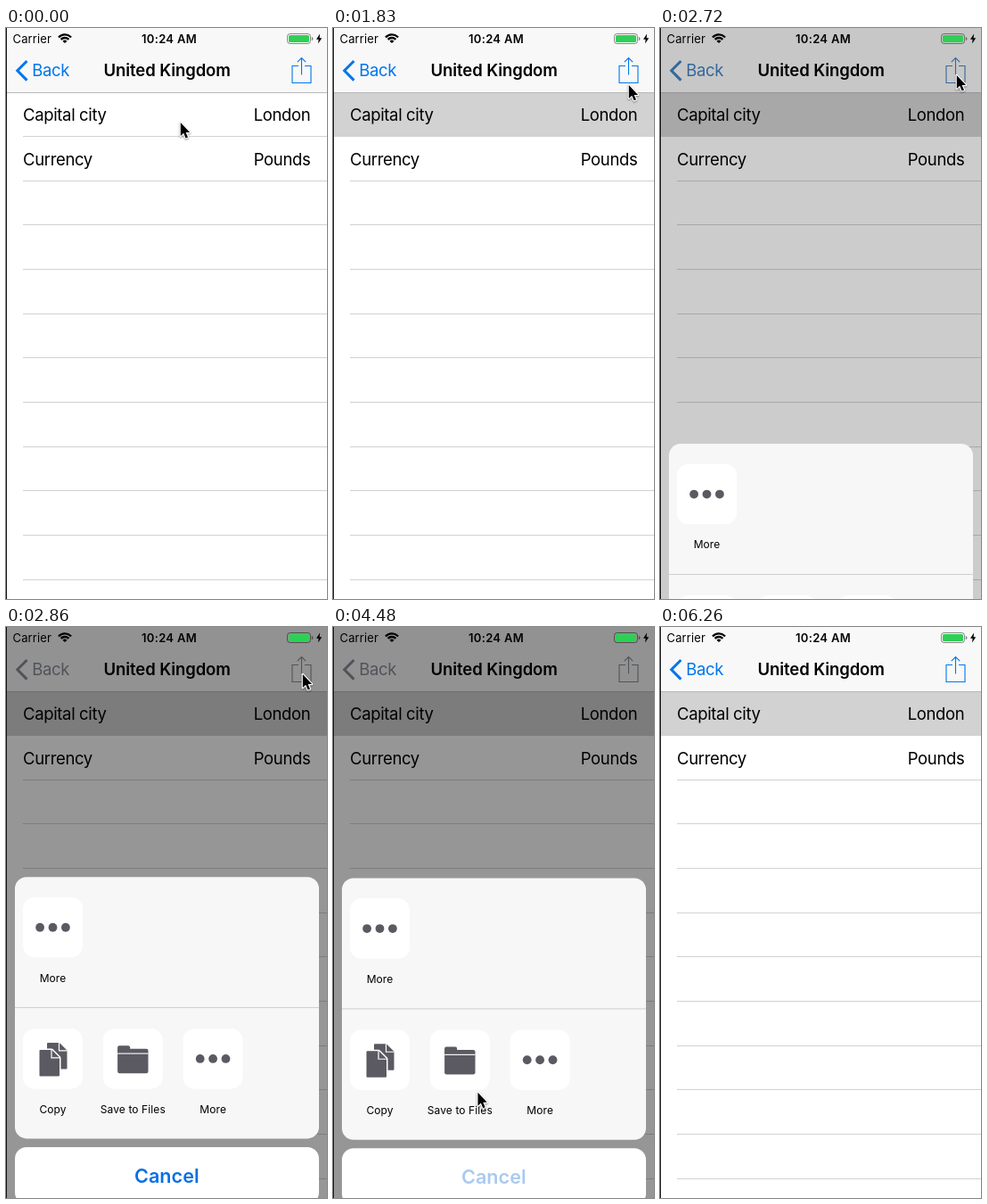
Recreate the animation shown at these times as an HTML page with a canvas. Size 360 by 640 pixels, loop 6290 ms.

```html
<!DOCTYPE html>
<html lang="en">
<head>
<meta charset="utf-8">
<title>Share sheet</title>
<style>
  html, body { margin: 0; width: 100%; height: 100%; overflow: hidden; background: #fff; }
  canvas { display: block; width: 360px; height: 640px; }
</style>
</head>
<body>
<canvas id="stage"></canvas>
<script>
const W = 360, H = 640, LOOP = 6290;
const canvas = document.getElementById('stage');
const ctx = canvas.getContext('2d');
const dpr = window.devicePixelRatio || 1;
canvas.width = W * dpr;
canvas.height = H * dpr;

const FONT = 'Inter, Roboto, "Liberation Sans", sans-serif';
const ICON = '#5b5a62';
const BLUE = [0, 118, 236], GREY = [142, 142, 147];
const ROW = 49.65, NAV = 72;
const SELECT_AT = 900, OPEN_AT = 2657.4, PRESS_AT = 4450, CLOSE_AT = 4467.7;
const DROP = 375, DIM = 0.43;

const smooth = u => u * u * (3 - 2 * u);
const linear = u => u;
const mix = (a, b, u) => a + (b - a) * u;

// The pointer rests between these moves.
const HOME = { x: 195, y: 105 };
const MOVES = [
  { from: 1350, to: 1830, x: 331, y: 63, ease: smooth },
  { from: 1830, to: 1920, x: 332, y: 52, ease: linear },
  { from: 3330, to: 3900, x: 181, y: 594, ease: smooth },
  { from: 4461, to: 4641, x: 7, y: -65, ease: linear }
];

// Critically damped spring from 0 to 1
function spring(ms) {
  const k = Math.max(0, ms) * 0.02465;
  return 1 - (1 + k) * Math.exp(-k);
}

function rect(x, y, w, h, color) {
  ctx.fillStyle = color;
  ctx.fillRect(x, y, w, h);
}

function round(x, y, w, h, r, color) {
  ctx.fillStyle = color;
  ctx.beginPath();
  ctx.roundRect(x, y, w, h, r);
  ctx.fill();
}

function disc(x, y, r, color) {
  ctx.fillStyle = color;
  ctx.beginPath();
  ctx.arc(x, y, r, 0, Math.PI * 2);
  ctx.fill();
}

function poly(points, closed) {
  ctx.beginPath();
  for (const [x, y] of points) ctx.lineTo(x, y);
  if (closed) ctx.closePath();
}

function stroke(width, color, join = 'miter') {
  ctx.lineJoin = join;
  ctx.lineWidth = width;
  ctx.strokeStyle = color;
  ctx.stroke();
}

function text(str, x, y, size, { weight = 400, gap = 0, align = 'left', color = '#000' } = {}) {
  ctx.font = `${weight} ${size}px ${FONT}`;
  ctx.letterSpacing = gap + 'px';
  ctx.textAlign = align;
  ctx.fillStyle = color;
  ctx.fillText(str, x, y);
}

function drawWifi(x, y) {
  const mid = -Math.PI / 2, spread = Math.PI * 0.26;
  for (const r of [6, 9.6]) {
    ctx.beginPath();
    ctx.arc(x, y, r, mid - spread, mid + spread);
    stroke(2.3, '#000');
  }
  ctx.beginPath();
  ctx.moveTo(x, y);
  ctx.arc(x, y, 3.4, mid - spread, mid + spread);
  ctx.fillStyle = '#000';
  ctx.fill();
}

function drawBattery(x, y) {
  const edge = 'rgba(0,0,0,.45)';
  ctx.beginPath();
  ctx.roundRect(x + 0.5, y + 0.5, 26, 11, 3);
  stroke(1, edge);
  round(x + 2, y + 2, 23, 8, 1.6, '#2fcf55');
  round(x + 27.8, y + 4, 1.6, 4, [0, 1.5, 1.5, 0], edge);
}

function drawBolt(x, y) {
  const half = s => [[x + s, y - 5.4 * s], [x - 3.1 * s, y + 0.7 * s], [x - 0.5 * s, y + 0.7 * s]];
  poly([...half(1), ...half(-1)], true);
  ctx.fillStyle = '#000';
  ctx.fill();
}

function drawStatus() {
  text('Carrier', 7.5, 16.5, 13, { gap: 0.15 });
  text('10:24 AM', 183, 16.5, 13, { weight: 600, gap: 0.3, align: 'center' });
  drawWifi(66, 17);
  drawBattery(315, 6);
  drawBolt(351.1, 12);
}

function drawShare(x, top, color) {
  const box = top + 9, base = top + 28, w = 10.5;
  poly([[x - 3.5, box], [x - w, box], [x - w, base], [x + w, base], [x + w, box], [x + 3.5, box]]);
  stroke(1.1, color);
  poly([[x, top + 19], [x, top]]);
  stroke(1.1, color);
  poly([[x - 4.7, top + 4.7], [x, top], [x + 4.7, top + 4.7]]);
  stroke(1.1, color);
}

function drawPage(selected, open) {
  const tint = `rgb(${BLUE.map((c, i) => Math.round(mix(c, GREY[i], open)))})`;
  rect(0, 0, W, H, '#fff');
  rect(0, 0, W, NAV, '#f8f8f8');
  for (let i = 1; i < 12; i++) rect(19, Math.floor(NAV + i * ROW), W, 1, '#d2d2d5');
  if (selected) rect(0, NAV, W, 50, '#d2d2d2');
  rect(0, NAV, W, 1, '#b8b8ba');

  poly([[23.5, 37], [12.8, 47.8], [23.5, 58.6]]);
  stroke(3, tint);
  text('Back', 29.3, 54.2, 18.5, { gap: -0.35, color: tint });
  text('United Kingdom', 180.7, 54.2, 18.5, { weight: 600, gap: -0.1, align: 'center' });
  drawShare(331.5, 33.5, tint);

  [['Capital city', 'London'], ['Currency', 'Pounds']].forEach(([label, value], i) => {
    const y = 104 + i * ROW;
    text(label, 19, y, 18.5, { gap: -0.35 });
    text(value, 341.4, y, 18.5, { gap: -0.35, align: 'right' });
  });
}

function dots(cx, cy) {
  for (const side of [-1, 0, 1]) disc(cx + side * 14.4, cy, 4.9, ICON);
}

function paper(x, y) {
  const w = 20.5, h = 27.5, fold = 8;
  poly([[x, y], [x + w - fold, y], [x + w, y + fold], [x + w, y + h], [x, y + h]], true);
  stroke(5, '#fff', 'round');
  stroke(2, ICON, 'round');
  ctx.fillStyle = ICON;
  ctx.fill();
  poly([[x + w - fold, y - 1], [x + w - fold, y + fold], [x + w + 1, y + fold]]);
  stroke(1.2, '#fff');
}

function copyIcon(cx, cy) {
  paper(cx - 5.5, cy - 17);
  paper(cx - 14, cy - 9);
}

function folderIcon(cx, cy) {
  const x = cx - 17.2;
  round(x, cy - 14.8, 14, 9, [2, 2, 0, 0], ICON);
  round(x, cy - 11.3, 34.4, 27.5, 2.2, ICON);
  rect(x, cy - 6.4, 34.4, 1.1, '#fff');
}

function tiles(y, items) {
  items.forEach(([label, icon], i) => {
    const x = 19 + i * 89.8;
    round(x, y, 67, 67.5, 13, '#fff');
    icon(x + 33.5, y + 33.8);
    text(label, x + 33.5, y + 94.7, 12, { gap: 0.1, align: 'center' });
  });
}

function drawSheet(offset, pressed) {
  ctx.save();
  ctx.translate(0, offset);
  round(10, 265.3, 341, 293.2, 13, '#f7f7f7');
  rect(10, 411.2, 341, 1, '#cfcfd3');
  tiles(288, [['More', dots]]);
  tiles(435.2, [['Copy', copyIcon], ['Save to Files', folderIcon], ['More', dots]]);
  round(10, 568, 341, 64, 13, '#fff');
  text('Cancel', 180.3, 608, 21.6, {
    weight: 600, align: 'center', color: pressed ? '#a9caee' : '#0a70e0'
  });
  ctx.restore();
}

function pointerAt(t) {
  let { x, y } = HOME;
  for (const m of MOVES) {
    if (t < m.from) break;
    const u = m.ease(Math.min(1, (t - m.from) / (m.to - m.from)));
    x = mix(x, m.x, u);
    y = mix(y, m.y, u);
  }
  return [x, y];
}

function drawPointer(t) {
  const [x, y] = pointerAt(t);
  ctx.save();
  ctx.translate(x + 0.8, y + 1);
  poly([[0, 0], [0, 15], [3.4, 11.8], [5.8, 17.4], [8.2, 16.4], [5.8, 11], [10.3, 11]], true);
  ctx.shadowColor = 'rgba(0,0,0,.4)';
  ctx.shadowBlur = 2 * dpr;
  ctx.shadowOffsetY = dpr;
  stroke(2.4, '#fff', 'round');
  ctx.shadowColor = 'transparent';
  ctx.fillStyle = '#000';
  ctx.fill();
  ctx.restore();
}

function draw(t) {
  const open = spring(t - OPEN_AT) - spring(t - CLOSE_AT);
  ctx.setTransform(dpr, 0, 0, dpr, 0, 0);
  drawPage(t >= SELECT_AT, open);
  if (open > 0.001) {
    rect(0, 0, W, H, `rgba(0,0,0,${DIM * open})`);
    drawSheet(DROP * (1 - open), t >= PRESS_AT);
  }
  drawStatus();
  rect(0, 0, 1, H, '#111');
  drawPointer(t);
}

const start = performance.now();
function tick() {
  draw((performance.now() - start) % LOOP);
  requestAnimationFrame(tick);
}
tick();
</script>
</body>
</html>
```
